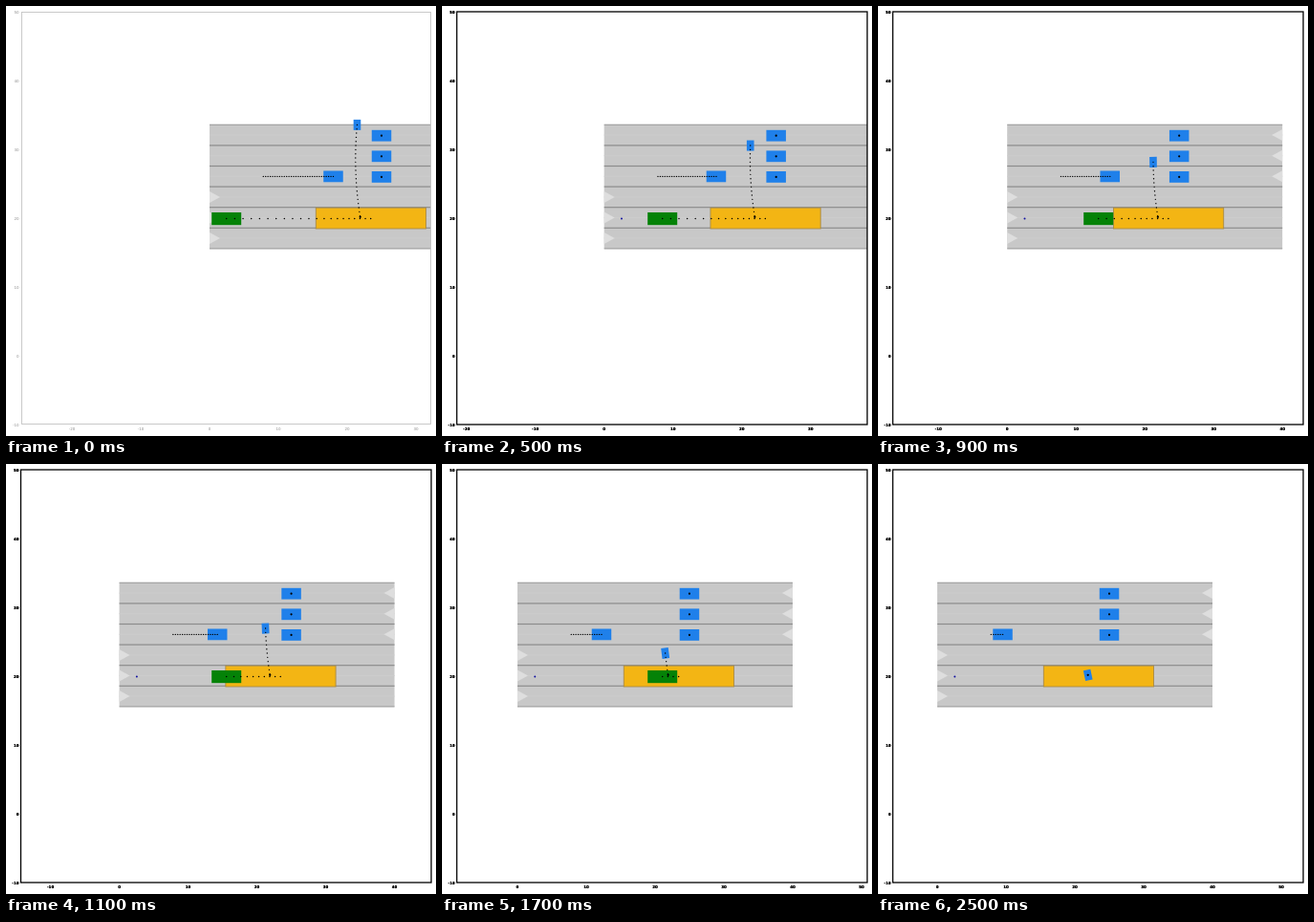
Animation of 450x450 px, one loop 2600 ms. Source, as an HTML page with a canvas:

```html
<!DOCTYPE html>
<html lang="en">
<head>
<meta charset="utf-8">
<title>Lane crossing simulation</title>
<style>
html, body { margin: 0; width: 100%; height: 100%; overflow: hidden; background: #fff; }
canvas { display: block; width: 450px; height: 450px; }
</style>
</head>
<body>
<canvas id="stage"></canvas>
<script>
const canvas = document.getElementById('stage');
const ctx = canvas.getContext('2d');
const dpr = window.devicePixelRatio || 1;
canvas.width = canvas.height = 450 * dpr;

const STEP = 100, STEPS = 26, EGO_END = 20;
const PLOT = { left: 15.5, top: 6, right: 445, bottom: 438 };
const TICK = 72;
const EGO_X = 230.7, EGO_Y = 222.4;
const ROAD = { top: 124.3, lane: 21.6, length: 288, start: 213 };
const BLUE = '#1f80ea';

// Ego travel per step: cruise, then ease down to a slower speed.
const travel = [0];
for (let k = 1; k <= EGO_END; k++) {
  travel[k] = travel[k - 1] + 5.6 + 3.07 / (1 + Math.exp((k - 13.2) / 1.3));
}

function box(cx, cy, w, h, color, angle = 0) {
  ctx.save();
  ctx.translate(cx, cy);
  ctx.rotate(angle);
  ctx.fillStyle = color;
  ctx.fillRect(-w / 2, -h / 2, w, h);
  ctx.restore();
}

function dot(x, y, r = 0.75, color = '#000') {
  ctx.fillStyle = color;
  ctx.beginPath();
  ctx.arc(x, y, r, 0, Math.PI * 2);
  ctx.fill();
}

function arrow(x, y, dir) {
  ctx.fillStyle = '#dedede';
  ctx.beginPath();
  ctx.moveTo(x, y - 6);
  ctx.lineTo(x + 11 * dir, y);
  ctx.lineTo(x, y + 6);
  ctx.fill();
}

function drawRoad(x) {
  const { top, lane, length } = ROAD;
  ctx.fillStyle = '#c8c8c8';
  ctx.fillRect(x, top, length, lane * 6);
  for (let i = 0; i < 6; i++) {
    const mid = top + lane * (i + 0.5);
    ctx.fillStyle = '#cccccc';
    ctx.fillRect(x, mid - 0.5, length, 1);
    if (i < 3) arrow(x + length, mid, -1);
    else arrow(x, mid, 1);
  }
  for (let i = 0; i <= 6; i++) {
    ctx.fillStyle = i % 6 ? '#8c8c8c' : '#a0a0a0';
    ctx.fillRect(x, top + lane * i - 0.6, length, 1.2);
  }
}

function drawZone(x) {
  ctx.fillStyle = '#f3b514';
  ctx.fillRect(x + 111.3, 211.2, 115.2, 21.8);
  ctx.strokeStyle = '#a98a45';
  ctx.lineWidth = 0.9;
  ctx.strokeRect(x + 111.3, 211.2, 115.2, 21.8);
}

function walker(k) {
  const y = Math.min(124.4 + 4.33 * k, 220.8);
  const d = y - 160;
  return { x: 152.8 + 0.00132 * d * d, y, angle: -Math.max(0, 0.0034 * d) };
}

function drawWalker(x, k) {
  const p = walker(k);
  box(x + p.x, p.y, 7.6, 11, BLUE, p.angle);
  for (let j = k; j < 23; j++) {
    const q = walker(j);
    dot(x + q.x, q.y, 0.7);
  }
  const end = walker(23);
  dot(x + end.x, end.y, 1.15);
}

function drawCars(x, k) {
  for (let i = 0; i < 3; i++) {
    const y = 135.7 + ROAD.lane * i;
    box(x + 180, y, 20.5, 11.8, BLUE);
    dot(x + 180, y, 1.1);
  }
  box(x + 129.5 - 2.44 * k, 178.4, 20.5, 11.8, BLUE);
  for (let j = k; j <= 30; j++) dot(x + 129.5 - 2.44 * j, 178.4, 0.7);
}

function drawEgo(x, k) {
  dot(x + 18.3, EGO_Y, 1, '#1010a0');
  if (k > EGO_END) return;
  box(EGO_X, EGO_Y + 0.2, 31, 13.2, '#048207');
  for (let j = k; j <= EGO_END; j++) {
    dot(EGO_X + travel[j] - travel[k], EGO_Y, 0.75);
  }
}

function drawAxes(x, first) {
  const { left, top, right, bottom } = PLOT;
  ctx.strokeStyle = first ? '#c4c4c4' : '#000';
  ctx.lineWidth = first ? 0.9 : 1.3;
  if (first) ctx.strokeRect(16.5, 6.5, 428, 431);
  else ctx.strokeRect(left, top, right - left, bottom - top);

  ctx.fillStyle = first ? 'rgba(0,0,0,.45)' : '#000';
  ctx.font = (first ? '' : 'bold ') + '4px "DejaVu Sans", sans-serif';
  const label = (text, tx, ty) => {
    for (let i = first ? 1 : 0; i < 2; i++) ctx.fillText(text, tx, ty);
  };
  ctx.textAlign = 'center';
  for (let n = -3; n <= 6; n++) {
    const tx = x + n * TICK;
    if (tx > left && tx < right) label(n * 10, tx, 444);
  }
  ctx.textAlign = 'right';
  for (let n = -1; n <= 5; n++) label(n * 10, 13.5, 367.7 - n * TICK);
}

function draw(k) {
  const x = ROAD.start - travel[Math.min(k, EGO_END)];
  ctx.setTransform(dpr, 0, 0, dpr, 0, 0);
  ctx.fillStyle = '#fff';
  ctx.fillRect(0, 0, 450, 450);
  ctx.save();
  ctx.beginPath();
  ctx.rect(PLOT.left, PLOT.top, PLOT.right - PLOT.left, PLOT.bottom - PLOT.top);
  ctx.clip();
  drawRoad(x);
  drawZone(x);
  drawEgo(x, k);
  drawCars(x, k);
  drawWalker(x, k);
  ctx.restore();
  drawAxes(x, k === 0);
}

const start = performance.now();
function tick() {
  const t = Math.max(0, performance.now() - start);
  draw(Math.floor(t / STEP) % STEPS);
  requestAnimationFrame(tick);
}
tick();
</script>
</body>
</html>
```
